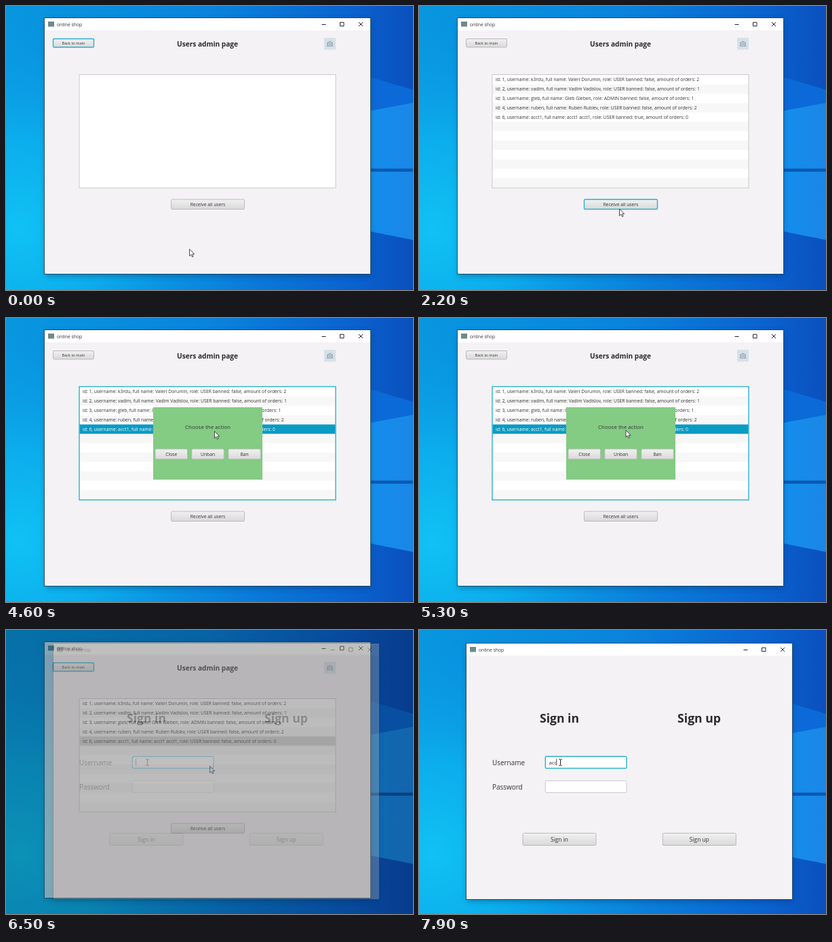
An HTML page for the animation above (8000 ms loop, 600 by 420 pixels).

```html
<!DOCTYPE html>
<html lang="en">
<head>
<meta charset="utf-8">
<title>Users admin page</title>
<style>
  html, body { margin: 0; width: 100%; height: 100%; overflow: hidden; background: #000; }
  svg { display: block; width: 600px; height: 420px; }
  text { font-family: "Open Sans", "Noto Sans", sans-serif; fill: #333; white-space: pre; }
  .title { font-weight: 700; fill: #2b2b2b; }
  .btn { fill: url(#face); stroke: #b6b6b6; stroke-width: .9; }
  .field { fill: #fff; stroke: #c4c4c4; stroke-width: .9; }
  .focus { stroke: #2ab0d4; stroke-width: 1.4; }
  .icon { fill: none; stroke: #222; stroke-width: 1; }
</style>
</head>
<body>
<svg id="stage" viewBox="0 0 600 420">
  <defs>
    <linearGradient id="sky">
      <stop offset="0" stop-color="#0897df"/>
      <stop offset=".5" stop-color="#0a84dc"/>
      <stop offset=".85" stop-color="#0a62cf"/>
      <stop offset="1" stop-color="#0a50bd"/>
    </linearGradient>
    <radialGradient id="glow" gradientUnits="userSpaceOnUse" cx="20" cy="330" r="330">
      <stop offset="0" stop-color="#10c2f4"/>
      <stop offset=".4" stop-color="#0db6f0" stop-opacity=".75"/>
      <stop offset="1" stop-color="#0a90e4" stop-opacity="0"/>
    </radialGradient>
    <linearGradient id="beam" gradientUnits="userSpaceOnUse" x1="530" y1="0" x2="600" y2="0">
      <stop offset="0" stop-color="#128fee"/>
      <stop offset="1" stop-color="#1b86e6"/>
    </linearGradient>
    <linearGradient id="face" x2="0" y2="1">
      <stop offset="0" stop-color="#f1f1f1"/>
      <stop offset="1" stop-color="#d9d9d9"/>
    </linearGradient>
    <filter id="shade" x="-10%" y="-10%" width="120%" height="120%">
      <feGaussianBlur stdDeviation="4"/>
    </filter>
    <g id="desktop">
      <rect width="600" height="420" fill="url(#sky)"/>
      <rect width="600" height="420" fill="url(#glow)"/>
      <path d="M500 94L600 124V143L500 162Z" fill="#0b6ad8"/>
      <path d="M500 162L600 143V346L500 326Z" fill="url(#beam)"/>
      <rect x="500" y="240.5" width="100" height="4.5" fill="#0759b0"/>
    </g>
    <g id="frame">
      <rect x="58" y="21" width="479" height="378" fill="#002a55" opacity=".4" filter="url(#shade)"/>
      <rect x="56.5" y="17.5" width="481" height="379" fill="#f4f2f4" stroke="#24506e"/>
      <rect x="57" y="18" width="480" height="18" fill="#fff"/>
      <rect x="62" y="23" width="9" height="7.5" fill="#71898a"/>
      <text x="75" y="29.5" font-size="6.8">online shop</text>
      <path class="icon" d="M465.5 27.5h6M492.5 24.2h5.5v5.5h-5.5zM520 24l6 6M526 24l-6 6"/>
    </g>
  </defs>
  <rect width="600" height="420"/>
  <g id="login"></g>
  <g id="admin"></g>
</svg>
<script>
const LOOP = 8000, STEP = 100, ROW = 13.86;
const $ = id => document.getElementById(id);

const users = [
  [1, "k3rdu", "Valeri Dorumin", "USER", false, 2],
  [2, "vadim", "Vadim Vadislov", "USER", false, 1],
  [3, "gleb", "Gleb Gleben", "ADMIN", false, 1],
  [4, "ruben", "Ruben Rubiev", "USER", false, 2],
  [6, "acct1", "acct1 acct1", "USER", true, 0]
];
const describe = ([id, name, full, role, banned, orders]) =>
  `id: ${id}, username: ${name}, full name: ${full}, role: ${role} banned: ${banned}, amount of orders: ${orders}`;

const rect = (x, y, w, h, attrs) => `<rect x="${x}" y="${y}" width="${w}" height="${h}" ${attrs}/>`;
const label = (x, y, size, str, attrs = 'text-anchor="middle"') =>
  `<text x="${x}" y="${y}" font-size="${size}" ${attrs}>${str}</text>`;
const button = (id, x, y, w, h, size, str) =>
  rect(x, y, w, h, `id="${id}" class="btn" rx="1.6"`) +
  label(x + w / 2, y + h / 2 + size * .36, size, str);

const rowTop = i => 102 + i * ROW;
const stripes = Array.from({ length: 6 }, (_, i) =>
  rect(108.5, rowTop(2 * i + 1), 377, Math.min(ROW, 269 - rowTop(2 * i + 1)), 'fill="#f8f7f8"')).join("");
const lines = users.map((u, i) =>
  label(113, 111.4 + i * ROW, 6.75, describe(u), `id="user${i}"`)).join("");

$("admin").innerHTML = `
  <use href="#desktop"/><use href="#frame"/>
  ${button("back", 69.5, 48.5, 60, 12.5, 5.6, "Back to main")}
  ${label(297, 59.5, 10.15, "Users admin page", 'class="title" text-anchor="middle"')}
  ${rect(469, 47, 17, 17.5, 'fill="#d6e0e7"')}
  <path d="M473 53.5h2l1-1.5h3l1 1.5h2v6.5h-9z" fill="#a5b3bd"/>
  <circle cx="477.5" cy="56.6" r="2" fill="#a5b3bd" stroke="#d6e0e7" stroke-width=".9"/>
  ${rect(108, 101.5, 378, 167.5, 'fill="#fff"')}
  <g id="rows">${stripes}${rect(108.5, rowTop(4), 377, ROW, 'id="pick"')}${lines}</g>
  ${rect(108, 101.5, 378, 167.5, 'id="list" class="field" style="fill:none"')}
  ${button("receive", 243.5, 286, 108, 14.5, 6.75, "Receive all users")}
  <g id="dialog">
    ${rect(217, 132, 161, 107, 'fill="#84cb84"')}
    ${label(297.5, 164.3, 7.98, "Choose the action")}
    ${button("close", 220, 193.8, 47.5, 15, 6.75, "Close")}
    ${button("unban", 273.8, 193.8, 47.5, 15, 6.75, "Unban")}
    ${button("ban", 327.8, 193.8, 47.5, 15, 6.75, "Ban")}
  </g>
  <path id="arrow" d="M0 0V10.2L2.4 8L4 11.6L5.6 10.9L4.1 7.4H7.2Z" fill="#fff" stroke="#222" stroke-width=".8"/>`;

const heading = 'class="title" text-anchor="middle"';
$("login").innerHTML = `
  <use href="#desktop"/><use href="#frame" x="13" y="2"/>
  ${label(207, 137.3, 17.6, "Sign in", heading)}
  ${label(413, 137.3, 17.6, "Sign up", heading)}
  ${label(108, 199.8, 9.95, "Username", "")}
  ${label(108, 235.8, 9.95, "Password", "")}
  ${rect(186.3, 187, 119.7, 17.5, 'class="field focus" rx="1.6"')}
  ${rect(186.3, 223, 119.7, 17.5, 'class="field" rx="1.6"')}
  ${label(191.7, 198.6, 7.4, "", 'id="typed"')}
  <path id="caret" d="M0 190.5v10" stroke="#222" stroke-width=".8"/>
  ${button("in", 153, 300.5, 108, 18, 8.4, "Sign in")}
  ${button("up", 359.3, 300.5, 108, 18, 8.4, "Sign up")}
  <path d="M206.2 191.3h1.7l.6.5.6-.5h1.7M208.5 191.8v8M206.2 200.3h1.7l.6-.5.6.5h1.7" class="icon" stroke-width=".8"/>`;

// time, x, y of the pointer tip
const pointer = [
  [0, 270.5, 359.5], [300, 270.5, 359.5], [1100, 295.5, 300], [2300, 295.5, 300],
  [3400, 310, 169], [4300, 310, 169], [4900, 305, 166], [5400, 305, 166], [6000, 300.5, 201], [LOOP, 300.5, 201]
];
// time, focused control
const focusAt = [[0, "back"], [1300, "receive"], [3900, "list"], [6200, "unban"], [6400, "back"]];
const T = { loaded: 1500, picked: 3900, open: 4400, shut: 6400, fade: 6300, fadeEnd: 6700 };
const keys = [[7400, "a"], [7600, "ac"], [7800, "acc"]];

const last = (table, t) => table.filter(k => k[0] <= t).pop();
const show = (id, on) => $(id).setAttribute("visibility", on ? "visible" : "hidden");

function pointerAt(t) {
  const i = Math.max(1, pointer.findIndex(k => k[0] > t));
  const [t0, x0, y0] = pointer[i - 1], [t1, x1, y1] = pointer[i];
  const p = (t - t0) / (t1 - t0), e = p * p * (3 - 2 * p);
  return [x0 + (x1 - x0) * e, y0 + (y1 - y0) * e];
}

function render(t) {
  const focus = last(focusAt, t)[1];
  for (const id of ["back", "receive", "list", "unban"]) $(id).classList.toggle("focus", id === focus);

  const picked = t >= T.picked, active = focus === "list";
  show("rows", t >= T.loaded);
  show("pick", picked);
  $("pick").setAttribute("fill", active ? "#0a9bc4" : "#d0cfd0");
  $("user4").style.fill = picked && active ? "#fff" : "#333";
  const user = users[4].slice();
  user[4] = t < T.shut;
  $("user4").textContent = describe(user);
  show("dialog", t >= T.open && t < T.shut);
  $("arrow").setAttribute("transform", `translate(${pointerAt(t)})`);

  const old = Math.min(1, Math.max(0, (T.fadeEnd - t) / (T.fadeEnd - T.fade)));
  $("admin").style.opacity = old;
  $("login").style.opacity = 1 - old;

  const word = (last(keys, t) || [0, ""])[1];
  $("typed").textContent = word;
  const end = word ? $("typed").getComputedTextLength() : 0;
  $("caret").setAttribute("transform", `translate(${191.6 + end})`);
  show("caret", word !== "" || t < 7000 || t >= 7300);
}

const start = performance.now();
function tick(now) {
  const t = Math.max(0, now - start) % LOOP;
  render(Math.floor(t / STEP) * STEP);
  requestAnimationFrame(tick);
}
render(0);
requestAnimationFrame(tick);
</script>
</body>
</html>
```
